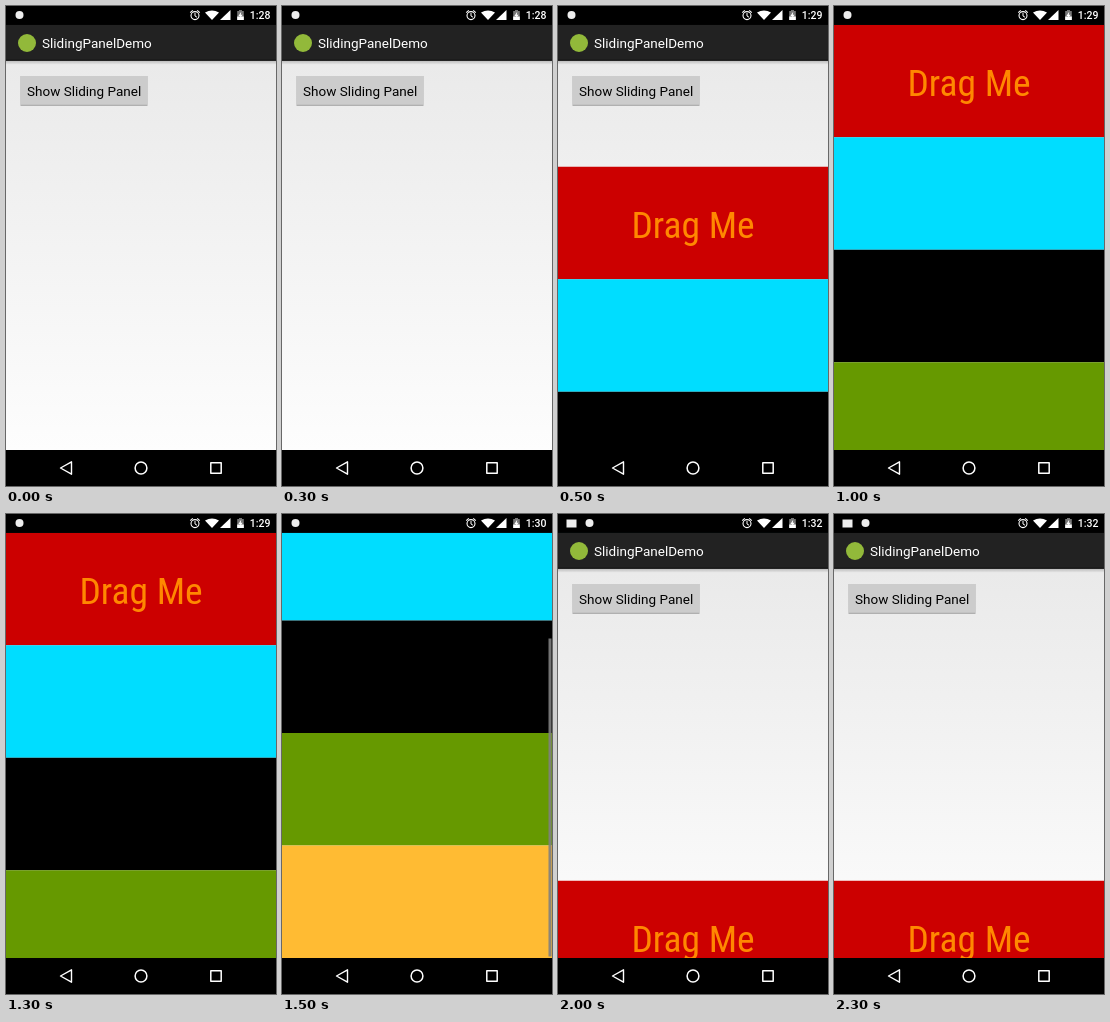
An HTML page with a canvas for the animation above (2500 ms loop, 270 px wide and 480 px high).

```html
<!DOCTYPE html>
<html lang="en">
<head>
<meta charset="utf-8">
<title>Sliding panel</title>
<style>
  html, body { margin: 0; width: 100%; height: 100%; overflow: hidden; background: #000; }
  canvas { display: block; width: 270px; height: 480px; }
</style>
</head>
<body>
<canvas id="stage" width="270" height="480"></canvas>
<script>
const ctx = document.getElementById('stage').getContext('2d');
const STEP = 500;
const WIDTH = 270, STATUS_BOTTOM = 18.75, BAR_BOTTOM = 54.75, NAV_TOP = 444;
const BAND = 112.5;
const BANDS = ['#cc0000', '#00ddff', '#000', '#669900', '#ffbb33'];

// panel: y of the panel's first band, or null while it is hidden
const STATES = [
  { clock: '1:28', panel: null },
  { clock: '1:29', panel: 160.75 },
  { clock: '1:29', panel: STATUS_BOTTOM },
  { clock: '1:30', panel: NAV_TOP - 5 * BAND, scrollbar: true },
  { clock: '1:32', panel: 366.75, mail: true }
];

function rect(x, y, w, h, color) {
  ctx.fillStyle = color;
  ctx.fillRect(x, y, w, h);
}

function text(str, x, y, font, color, align = 'left') {
  ctx.font = font;
  ctx.fillStyle = color;
  ctx.textAlign = align;
  ctx.fillText(str, x, y);
}

function polygon(color, ...points) {
  ctx.beginPath();
  points.forEach(([x, y]) => ctx.lineTo(x, y));
  ctx.closePath();
  ctx.fillStyle = color;
  ctx.fill();
}

function disc(x, y, r, color) {
  ctx.beginPath();
  ctx.arc(x, y, r, 0, Math.PI * 2);
  ctx.fillStyle = color;
  ctx.fill();
}

function ring(x, y, r, width) {
  ctx.beginPath();
  ctx.arc(x, y, r, 0, Math.PI * 2);
  ctx.lineWidth = width;
  ctx.stroke();
}

function line(width, ...points) {
  ctx.beginPath();
  points.forEach(([x, y]) => ctx.lineTo(x, y));
  ctx.lineWidth = width;
  ctx.stroke();
}

function verticalGradient(top, bottom, from, to) {
  const g = ctx.createLinearGradient(0, top, 0, bottom);
  g.addColorStop(0, from);
  g.addColorStop(1, to);
  return g;
}

function drawApp() {
  rect(0, 54, WIDTH, NAV_TOP - 54, verticalGradient(STATUS_BOTTOM, NAV_TOP, '#e8e8e8', '#fdfdfd'));
  rect(0, BAR_BOTTOM, WIDTH, 4, verticalGradient(BAR_BOTTOM, BAR_BOTTOM + 4, 'rgba(0,0,0,.2)', 'rgba(0,0,0,0)'));
  rect(0, STATUS_BOTTOM, WIDTH, BAR_BOTTOM - STATUS_BOTTOM, '#222');
  rect(0, 53.5, WIDTH, 1.25, '#161616');
  disc(21, 37, 9, '#92b93a');
  text('SlidingPanelDemo', 36, 42, '13.5px Roboto, sans-serif', '#fff');

  rect(14.5, 70, 127, 30, '#b0b0b0');
  rect(15, 70, 126, 28.7, '#cccccc');
  text('Show Sliding Panel', 21, 90, '13.5px Roboto, sans-serif', '#000');
}

function drawPanel(top, scrollbar) {
  ctx.save();
  ctx.beginPath();
  ctx.rect(0, STATUS_BOTTOM, WIDTH, NAV_TOP - STATUS_BOTTOM);
  ctx.clip();
  BANDS.forEach((color, i) => rect(0, top + i * BAND, WIDTH, BAND, color));
  text('Drag Me', WIDTH / 2, top + 71.3,
    'condensed 37.5px "Roboto Condensed", Roboto, sans-serif', '#ff8800', 'center');
  if (scrollbar) rect(266.5, 124.5, 3, 318, 'rgba(128,128,128,.9)');
  ctx.restore();
}

function drawStatus(clock, mail) {
  rect(0, 0, WIDTH, STATUS_BOTTOM, '#000');
  if (mail) rect(8.5, 5.5, 10, 8, '#eee');
  disc(mail ? 31.5 : 13.5, 9, 4, '#eee');

  ctx.strokeStyle = '#fff';
  ring(189, 9.6, 4, 1.1);
  line(1, [189, 7], [189, 10], [191, 11.2]);
  line(1.1, [184.2, 6.6], [186.8, 4.4]);
  line(1.1, [191.2, 4.4], [193.8, 6.6]);

  ctx.beginPath();
  ctx.moveTo(206, 14);
  ctx.lineTo(199, 6.5);
  ctx.quadraticCurveTo(206, 2.5, 213, 6.5);
  ctx.closePath();
  ctx.fillStyle = '#fff';
  ctx.fill();

  polygon('#fff', [214, 14], [224.5, 14], [224.5, 4]);

  rect(231.2, 5, 6.6, 9, '#777');
  rect(233, 4, 3, 1.2, '#777');
  rect(231.2, 10.5, 6.6, 3.5, '#fff');
  polygon('#fff', [235.2, 5.8], [232.4, 10], [234.2, 10], [233.8, 12.6], [236.6, 8.8], [234.8, 8.8]);

  text(clock, 264.5, 13, '500 10.5px Roboto, sans-serif', '#fff', 'right');
}

function drawNav() {
  rect(0, NAV_TOP, WIDTH, 36, '#000');
  ctx.strokeStyle = '#fff';
  ctx.lineJoin = 'round';
  ctx.lineWidth = 1.4;
  ctx.beginPath();
  ctx.moveTo(54.5, 462);
  ctx.lineTo(65.5, 455.8);
  ctx.lineTo(65.5, 468.2);
  ctx.closePath();
  ctx.stroke();
  ring(135, 462, 5.9, 1.5);
  ctx.strokeRect(204.8, 456.8, 10.4, 10.4);
}

function draw(now) {
  const { clock, panel, scrollbar, mail } = STATES[Math.floor(now / STEP) % STATES.length];
  drawApp();
  if (panel !== null) drawPanel(panel, scrollbar);
  drawStatus(clock, mail);
  drawNav();
}

const start = performance.now();
function tick() {
  draw(performance.now() - start);
  requestAnimationFrame(tick);
}
tick();
</script>
</body>
</html>
```
